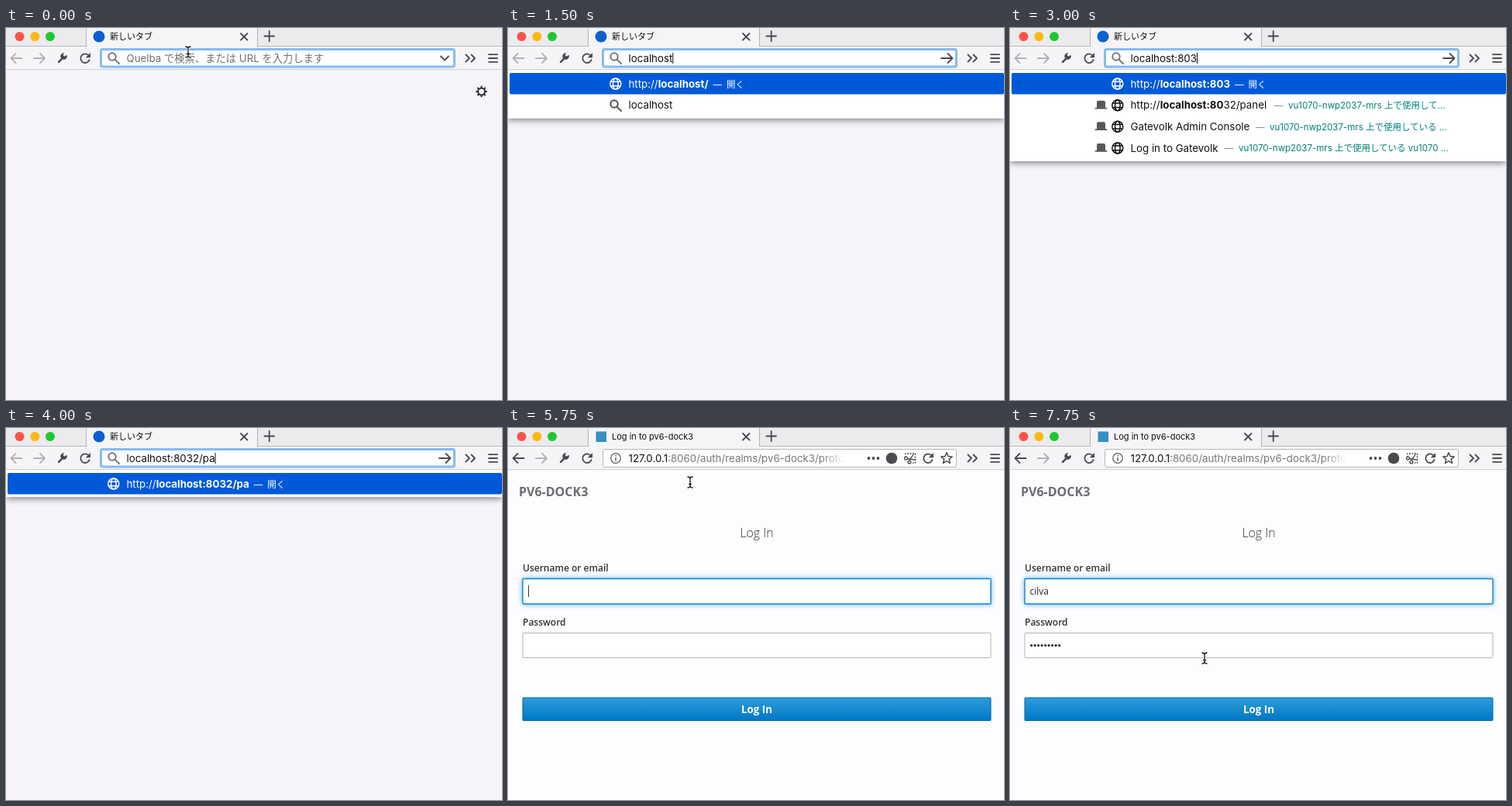
Recreate the animation shown at these times as an HTML page. Size 640 by 480 pixels, loop 8 s.

```html
<!DOCTYPE html>
<html lang="ja">
<head>
<meta charset="utf-8">
<title>Login walkthrough</title>
<style>
html, body { margin: 0; width: 100%; height: 100%; overflow: hidden; background: #f5f4f9; }
svg { display: block; width: 640px; height: 480px; }
text { font-family: Inter, "Noto Sans CJK JP", "Noto Sans CJK", sans-serif; font-size: 13.3px; white-space: pre; }
.tab { font-size: 11px; fill: #111; }
.small { font-size: 11.5px; }
.form, .form text { font-family: "Open Sans", sans-serif; }
.line { fill: none; stroke: #4a4a4f; stroke-width: 1.8; stroke-linecap: round; stroke-linejoin: round; }
.panel { filter: drop-shadow(0 2px 4px rgba(0,0,0,.5)); }
.menu { filter: drop-shadow(0 3px 4px rgba(0,0,0,.35)); }
.glow { filter: drop-shadow(0 0 3px rgba(0,136,206,.6)); }
</style>
</head>
<body>
<svg id="stage" viewBox="0 0 640 480">
  <defs>
    <linearGradient id="btn" x2="0" y2="1">
      <stop offset="0" stop-color="#2d9cdb"/><stop offset="1" stop-color="#0078c6"/>
    </linearGradient>
    <linearGradient id="fade" gradientUnits="userSpaceOnUse" x1="404" x2="434">
      <stop offset="0" stop-color="#fff" stop-opacity="0"/><stop offset="1" stop-color="#fff"/>
    </linearGradient>
  </defs>
  <g id="page"></g>
  <g id="drop"></g>
  <g id="chrome">
    <rect width="640" height="24" fill="#ebeaec"/>
    <path d="M0 23.5H640" stroke="#b9b8bb"/>
    <rect y="24" width="640" height="29" fill="#f5f5f7"/>
    <rect x="104" width="220" height="24" fill="#f5f5f7"/>
    <path d="M103.500 0V24M324.500 0V24" stroke="#b4b3b6"/>
    <path d="M0 53.500H640" stroke="#cfced2"/>
    <circle cx="17.500" cy="11" r="6" fill="#fc5348"/>
    <circle cx="37.300" cy="11" r="6" fill="#fdb80a"/>
    <circle cx="57" cy="11" r="6" fill="#1ec831"/>
    <path class="line" stroke-width="1.500" d="M303 7l8.500 8.500M311.500 7l-8.500 8.500M333.500 10.500H346M339.700 4V17"/>
    <path class="line" d="M593.500 34.500l4.500 4.500-4.500 4.500M600.500 34.500l4.500 4.500-4.500 4.500M623 34.200H634M623 39H634M623 43.800H634"/>
    <path class="line" style="stroke-width:2.600" d="M68 43.800L73.500 38.300"/>
    <path d="M78.500 34.800a4.300 4.300 0 1 1-3.300-2.600l-1.700 2.500 2 2z" fill="#4a4a4f"/>
  </g>
  <g id="tab"></g>
  <g id="bar"></g>
  <g id="mouse"></g>
</svg>
<script>
const STEP = 250, LOOP = 8000, DARK = '#4a4a4f';
const MACHINE = 'vu1070-nwp2037-mrs';
const $ = id => document.getElementById(id);

// [start, typed text, rows in the list, caret visible]
const typing = [
  [0, '', 0, 0], [500, 'l', 1, 1], [750, 'loc', 1, 1], [1000, 'local', 1, 1],
  [1250, 'localho', 1, 1], [1500, 'localhost', 2, 1], [1750, 'localhost:', 2, 1],
  [2000, 'localhost:80', 4, 1], [2500, 'localhost:80', 4, 0],
  [3000, 'localhost:803', 4, 1], [3250, 'localhost:8032', 4, 1],
  [3500, 'localhost:8032/', 1, 1], [3750, 'localhost:8032/p', 1, 1],
  [4000, 'localhost:8032/pa', 1, 1], [4250, 'localhost:8032/pan', 1, 1],
  [4500, 'localhost:8032/panel', 1, 1]
];
const LOAD = 4750, REDIRECT = 5000, READY = 5500, MENU = 6750, FILLED = 7250;

// [time, x, y]
const path = [
  [5750, 235, 70], [6250, 237, 190], [6500, 238, 219], [6750, 238, 219],
  [7000, 238, 234], [7250, 240, 240], [7500, 245, 262], [7750, 251, 297]
];

const text = (x, y, s, attrs = '') => `<text x="${x}" y="${y}" ${attrs}>${s}</text>`;
const line = (d, attrs = '') => `<path class="line" d="${d}" ${attrs}/>`;
const bold = s => `<tspan font-weight="700">${s}</tspan>`;
const reload = x => line(`M${x + 4.6} 35.500a5.800 5.800 0 1 0 1 5.500`) +
  `<path d="M${x + 7} 32v6.300h-6.300z" fill="${DARK}"/>`;
const cross = x => line(`M${x - 5.5} 33.500l11 11m0-11l-11 11`);
const chevron = x => line(`M${x - 5} 36.500l5 5 5-5`);
const lens = (x, y, c) =>
  `<g fill="none" stroke="${c}" stroke-width="2"><circle cx="${x}" cy="${y}" r="4.700"/>
   <path stroke-linecap="round" d="M${x + 3.6} ${y + 3.6}l5.400 5.400"/></g>`;
const globe = (y, c) =>
  `<g transform="translate(138.800 ${y})" fill="none" stroke="${c}" stroke-width="1.500">
   <circle r="7"/><ellipse rx="3.300" ry="7"/><path d="M-6.300-2.800H6.300M-6.300 2.800H6.300"/></g>`;
const laptop = y =>
  `<path fill="#58585c" d="M112 ${y + 3}v-7q0-2 2-2h7q2 0 2 2v7h2.300v1.800h-15.600v-1.800z"/>`;

function gear() {
  let teeth = '';
  for (let i = 0; i < 8; i++) teeth += `<path d="M0-4.500V-7.200" transform="rotate(${i * 45})"/>`;
  return `<g transform="translate(613.500 82)" fill="none" stroke="#222226" stroke-width="1.900">
    <circle r="4.400"/>${teeth}</g>`;
}

function form(t) {
  const light = t === MENU, filled = t >= FILLED;
  let s = `<rect width="640" height="480" fill="#fdfcfe"/><g class="form">` +
    text(14, 87.5, 'PV6-DOCK3', 'style="font-size:16px" font-weight="700" fill="#6c6c70"') +
    text(321, 141, 'Log In', 'style="font-size:15.800px" font-weight="300" text-anchor="middle" fill="#333"') +
    text(19, 184.5, 'Username or email', 'style="font-size:12px" font-weight="600" fill="#333"') +
    text(19, 254.5, 'Password', 'style="font-size:12px" font-weight="600" fill="#333"') +
    `<rect class="glow" x="19" y="194.500" width="604" height="32.500" rx="1" fill="#fff"
      stroke="${light ? '#59b5f0' : '#0c86d0'}" stroke-width="1.400"/>
     <rect x="19" y="264.500" width="604" height="32" rx="1" fill="#fff" stroke="#b5b4b8"/>
     <rect x="19" y="348" width="604" height="29.500" rx="1" fill="url(#btn)" stroke="#0067aa"/>` +
    text(321, 367.5, 'Log In', 'style="font-size:13.300px" font-weight="700" text-anchor="middle" fill="#fff"');
  if (filled) {
    s += text(25.5, 214.5, 'cilva', 'style="font-size:12px" fill="#222"');
    for (let i = 0; i < 9; i++) s += `<circle cx="${27.6 + i * 4.5}" cy="280.500" r="1.600" fill="#222"/>`;
  } else {
    s += `<path d="M26.500 203V218" stroke="#333"/>`;
  }
  s += '</g>';
  if (t >= MENU && !filled) {
    s += `<rect class="menu" x="18.500" y="226.500" width="604.500" height="37.500" fill="#fff" stroke="#bdbcc0"/>`;
    ['cilva', 'gatevolk'].forEach((name, i) => {
      const y = 235.5 + i * 18.2;
      s += `<g fill="#77777b"><circle cx="34.500" cy="${y - 2.5}" r="4"/>
        <path d="M32 ${y - 2}l-6.500 6.500v2h3v-1.700h1.800v-1.800l4-3z"/></g>
        <circle cx="35.600" cy="${y - 3.6}" r="1" fill="#fff"/>` +
        text(43, y + 4.5, name, 'style="font-size:12px" fill="#111"');
    });
  }
  return s;
}

function list(s, rows) {
  if (!rows) return '';
  const host = s.startsWith('localhost');
  const base = s === 'localhost' ? 'http://' + bold('localhost/')
    : /:(80)?$/.test(s) ? 'http://localhost/' : 'http://' + bold(s);
  const act = host ? '開く' : 'Quelba で検索';
  let out = `<rect class="panel" y="50" width="640" height="${11.5 + 27.6 * rows}" fill="#fff"/>
    <rect x="2" y="58" width="638" height="27.500" rx="2" fill="#0059d9"/>` +
    (host ? globe(72, '#fff') : lens(137, 70.5, '#fff')) +
    text(155.5, 77, `${host ? base : s}<tspan class="small" dx="6">—</tspan><tspan class="small" dx="6">${act}</tspan>`, 'fill="#fff"');
  if (rows === 2) {
    out += lens(137, 98, '#4f4f53') + text(155.5, 104.3, 'localhost', 'fill="#111"');
  }
  if (rows === 4) {
    [['http://' + bold('localhost:80') + '32/panel', 341, ' 上で使用して...'],
     ['Gatevolk Admin Console', 317, ' 上で使用している ...'],
     ['Log in to Gatevolk', 277, ' 上で使用している vu1070 ...']].forEach(([label, x, tail], i) => {
      const y = 99.7 + i * 27.6;
      out += laptop(y) + globe(y, '#111') + text(155.5, y + 4.7, label, 'fill="#111"') +
        text(x, y + 4.5, '—', 'class="small" fill="#85858a"') +
        text(x + 18, y + 4.5, MACHINE + tail, 'class="small" fill="#008078"');
    });
  }
  return out;
}

function tab(t) {
  let icon = '<circle cx="120" cy="11" r="7.500" fill="#0b62cf"/>';
  if (t >= READY) icon = '<rect x="113.500" y="4.500" width="13.500" height="13.500" fill="#368fc6"/>';
  else if (t >= LOAD) {
    const x = t === LOAD ? 116 : t === REDIRECT ? 125 : 121;
    icon = `<ellipse cx="${x}" cy="11" rx="2.700" ry="1.900" fill="#0a84ff"/>`;
  }
  return icon + text(134, 15, t < REDIRECT ? '新しいタブ' : 'Log in to pv6-dock3', 'class="tab"');
}

function buttons(t) {
  const arrow = (x, dir, on) =>
    line(`M${x - 7 * dir} 39H${x + 7 * dir}M${x - 1 * dir} 33l${-6 * dir} 6 ${6 * dir} 6`,
      on ? '' : 'style="stroke:#b3b2b6"');
  const loading = t >= LOAD && t < READY;
  return arrow(13.5, 1, t >= REDIRECT) + arrow(43, -1, false) + (loading ? cross(102.5) : reload(102));
}

function focusedBar(s, caret) {
  return `<rect x="122.500" y="27.500" width="456" height="22.500" rx="2.500" fill="#fff" stroke="#83bbf5" stroke-width="3"/>` +
    lens(137, 37, '#77777b') +
    (s ? text(155.5, 43.5, s, 'id="typed" fill="#111"') + line('M559 39H573.500M567.500 33l6 6-6 6')
       : text(155.5, 43.5, 'Quelba で検索、または URL を入力します', 'fill="#707075"') + chevron(566)) +
    (caret ? '<path id="caret" d="M0 32V46" stroke="#111"/>' : '');
}

function star() {
  let d = '';
  for (let i = 0; i < 10; i++) {
    const r = i % 2 ? 3.4 : 7.6, a = i * Math.PI / 5;
    d += (i ? 'L' : 'M') + (566 + r * Math.sin(a)).toFixed(1) + ' ' + (39.3 - r * Math.cos(a)).toFixed(1);
  }
  return line(d + 'z', 'style="stroke-width:1.500"');
}

function pageBar(t) {
  const url = t < REDIRECT ? 'localhost<tspan fill="#77777b">:8032/panel</tspan>'
    : '127.0.0.1<tspan fill="#77777b">:8060/auth/realms/pv6-dock3/proto</tspan>';
  return `<rect x="122.500" y="27.500" width="456" height="23" rx="2.500" fill="#fff" stroke="#b8b7bb"/>
    <circle cx="139" cy="39" r="6.300" fill="none" stroke="#5c5c60" stroke-width="1.200"/>
    <path d="M139 38V42.500M139 35V36.500" stroke="#5c5c60" stroke-width="1.500"/>` +
    text(155.5, 43.5, url, 'fill="#111"') +
    `<rect x="404" y="30" width="60" height="18" fill="url(#fade)"/>` +
    (t < READY ? chevron(447) : '') +
    [465.5, 471.5, 477.5].map(x => `<circle cx="${x}" cy="39" r="1.900" fill="${DARK}"/>`).join('') +
    `<circle cx="495" cy="39" r="7.300" fill="${DARK}"/>
    <g fill="none" stroke="${DARK}" stroke-width="1.400">
      <path stroke-dasharray="2 1.500" d="M513 38V33H525.500V45H522"/>
      <circle cx="513.500" cy="39" r="1.900"/><circle cx="518" cy="44" r="1.900"/>
      <path d="M515 39.500L525 41M518 42L523 34"/>
    </g>` + (t < READY ? cross(542.5) : reload(542)) + star();
}

function ibeam(t) {
  let p = null;
  if (t < 500) p = [235, 31];
  else for (const [at, x, y] of path) if (t >= at) p = [x, y];
  if (!p) return '';
  const d = 'M-3.500-7Q0-7 0-4.500Q0-7 3.500-7M0-5V5M-3.500 7Q0 7 0 4.500Q0 7 3.500 7M-1.800 2.500H1.800';
  return `<g transform="translate(${p})" fill="none"><path d="${d}" stroke="#fff" stroke-width="3"/>
    <path d="${d}" stroke="#111" stroke-width="1.300"/></g>`;
}

function draw(t) {
  const [, s, rows, caret] = typing.filter(e => e[0] <= t).pop();
  const open = t < LOAD;
  $('page').innerHTML = t < READY ? '<rect width="640" height="480" fill="#f5f4f9"/>' + gear() : form(t);
  $('drop').innerHTML = open ? list(s, rows) : '';
  $('tab').innerHTML = tab(t);
  $('bar').innerHTML = buttons(t) + (open ? focusedBar(s, caret) : pageBar(t));
  $('mouse').innerHTML = ibeam(t);
  if (open && caret) {
    const x = 156 + $('typed').getComputedTextLength();
    $('caret').setAttribute('transform', `translate(${x.toFixed(1)} 0)`);
  }
}

const start = performance.now();
let last = -1;
function tick() {
  const t = Math.floor((performance.now() - start) % LOOP / STEP) * STEP;
  if (t !== last) draw(last = t);
  requestAnimationFrame(tick);
}
tick();
</script>
</body>
</html>
```
